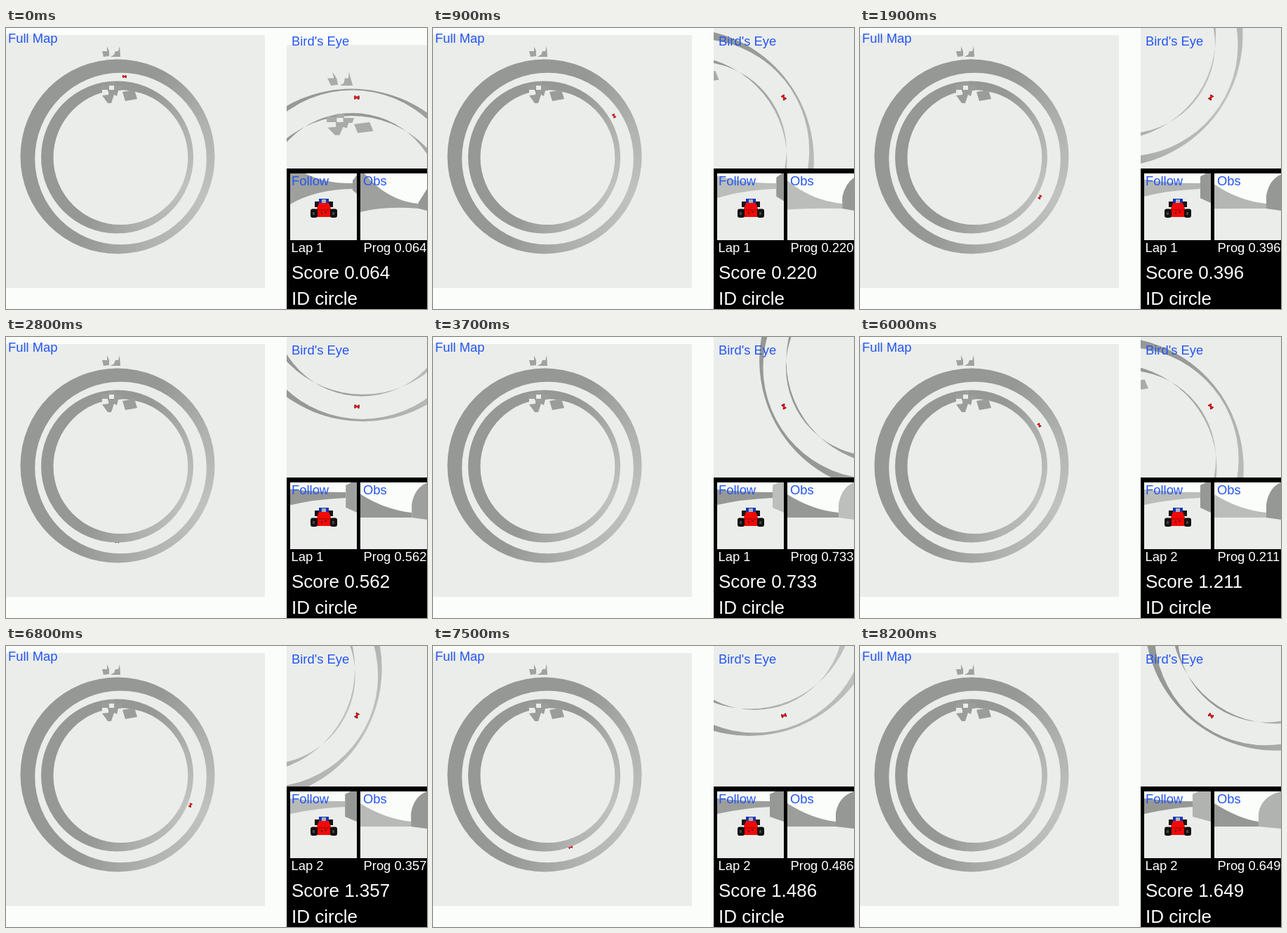
Animation, 600 px wide and 400 px high, one loop 8.3 s. Source, as an HTML page with a canvas:

```html
<!DOCTYPE html>
<html lang="en">
<head>
<meta charset="utf-8">
<title>Circle track</title>
<style>
  html, body { margin: 0; width: 600px; height: 400px; overflow: hidden; }
  canvas { display: block; }
</style>
</head>
<body>
<canvas id="stage" width="600" height="400"></canvas>
<script>
const ctx = document.getElementById('stage').getContext('2d');
const LOOP = 8300, STEP = 100, ZOOM = 1.3, RISE = 1.18;
const SKY = '#fbfdfa', FLOOR = '#ebedea', BLUE = '#2456f2', RED = '#f00a08';
const CENTRE = { x: 164, y: 183 };
const OUTER = 122, INNER = 97, LIGHT = 26 * Math.PI / 180;

// time, car angle clockwise from the top, score, left edge of the inner wall seen by the car
const KEYS = [
  [0, 2.5, 0.064, 588],
  [1900, 122, 0.396, 579],
  [3700, 246.6, 0.733, 578],
  [4800, 330.4, 0.956, 575],
  [6000, 417.9, 1.211, 579],
  [7500, 522.8, 1.486, 574],
  [8200, 574, 1.649, 568]
];

// Cubic Hermite interpolation through one column of KEYS
function sample(t, col) {
  const last = KEYS.length - 1;
  let i = 0;
  while (i < last - 1 && t >= KEYS[i + 1][0]) i++;
  const slope = j => {
    const a = KEYS[Math.max(0, j - 1)], b = KEYS[Math.min(last, j + 1)];
    return (b[col] - a[col]) / (b[0] - a[0]);
  };
  const a = KEYS[i], b = KEYS[i + 1], span = b[0] - a[0];
  const u = (t - a[0]) / span, v = 1 - u;
  return a[col] * (1 + 2 * u) * v * v + slope(i) * span * u * v * v
       + b[col] * u * u * (3 - 2 * u) - slope(i + 1) * span * u * u * v;
}

function rect(x, y, w, h, fill) {
  ctx.fillStyle = fill;
  ctx.fillRect(x, y, w, h);
}

function shape(path, fill) {
  ctx.fillStyle = fill;
  ctx.fill(new Path2D(path));
}

function text(str, x, y, size, fill) {
  ctx.font = `${size}px "Liberation Sans", Arial, sans-serif`;
  ctx.fillStyle = fill;
  ctx.fillText(str, x, y);
}

function view(x, y, w, h, draw) {
  ctx.save();
  ctx.beginPath();
  ctx.rect(x, y, w, h);
  ctx.clip();
  draw();
  ctx.restore();
}

// Visible side of a round wall: the area between its foot and its rim
function wall(foot, rim) {
  const g = ctx.createConicGradient(LIGHT, CENTRE.x, CENTRE.y);
  for (const at of [0, 1]) g.addColorStop(at, '#c0c2bf');
  for (const at of [0.125, 0.875]) g.addColorStop(at, '#b1b3b0');
  for (const at of [0.25, 0.75]) g.addColorStop(at, '#969895');
  ctx.fillStyle = g;
  ctx.beginPath();
  for (const [x, y, r] of [foot, rim]) {
    ctx.moveTo(x + r, y);
    ctx.arc(x, y, r, 0, Math.PI * 2);
  }
  ctx.fill('evenodd');
}

const GANTRY = 'M137 33H144V26L147 33V40L139 41ZM160 33L162 26L163 41H149L154 38L156 33Z';
const BOARD = 'M136 80H147V76H155V82H166L164 89H160L158 97L154 95L150 107H145L137 96L146 95V88H136Z' +
              'M166 91L183 88L187 101L170 104Z';
const HOLES = 'M147 82H154V88H147ZM137 88H145V95H137Z';

function banner(dy, squash, fill) {
  ctx.save();
  ctx.translate(0, 92 + dy);
  ctx.scale(1, squash);
  ctx.translate(0, -92);
  shape(BOARD, fill);
  shape(HOLES, FLOOR);
  ctx.restore();
}

function smallCar(car) {
  ctx.save();
  ctx.translate(car.x, car.y);
  ctx.rotate(car.angle);
  for (const x of [-2.8, 1.2]) rect(x, -2, 1.4, 4, '#301010');
  rect(-2.8, -1.2, 5.6, 2.4, RED);
  rect(1.8, -0.7, 0.8, 1.4, '#4048a0');
  ctx.restore();
}

function fullMap(car) {
  view(0, 10, 369, 360, () => {
    rect(0, 10, 369, 360, FLOOR);
    smallCar(car);
    wall([163.5, 186, 122.3], [159, 183, 138.5]);
    wall([163.4, 184.2, 95.9], [158.5, 184, 108.5]);
    shape(GANTRY, '#a0a29f');
    banner(0, 1, '#9b9d9a');
  });
}

function birdsEye(car) {
  view(400, 0, 200, 200, () => {
    rect(400, 0, 200, 200, SKY);
    ctx.translate(500, 99);
    ctx.scale(ZOOM, ZOOM);
    ctx.translate(-car.x, -car.y);
    rect(-100, 11.5, 600, 500, FLOOR);
    const raised = (r, k) => [car.x + (CENTRE.x - car.x) * k, car.y + (CENTRE.y - car.y) * k, r * k];
    for (const r of [OUTER, INNER]) wall(raised(r, 1), raised(r, RISE));
    banner(7, 0.75, '#a9aba8');
    ctx.save();
    ctx.translate(150, 49);
    ctx.transform(1, 0, (car.x - 150) * 0.012, 1, 0, 0);
    ctx.translate(-150, -34);
    shape(GANTRY, '#a9aba8');
    ctx.restore();
    smallCar(car);
  });
}

// Wall grey for a surface facing the given direction
function shade(angle) {
  const lit = Math.max(0, Math.cos(angle - 2.02));
  const v = Math.round(150 + 40 * lit);
  return `rgb(${v},${v + 2},${v - 1})`;
}

function followCar() {
  rect(440, 247, 6, 8, '#151515');
  rect(459, 247, 7, 8, '#151515');
  rect(446, 243, 14, 6, '#1234b8');
  shape('M446 249H460L463 257L465 269H441L443 257Z', RED);
  shape('M443 258H463L464 260H442Z', '#c40806');
  rect(450, 244, 6, 5, '#a9b0bd');
  rect(449, 262, 2, 3, '#801010');
  rect(454, 261, 3, 2, '#801010');
  for (const x of [434, 462]) {
    ctx.fillStyle = '#111';
    ctx.beginPath();
    ctx.roundRect(x, 257.5, 10, 12.5, 3);
    ctx.fill();
    rect(x + 3, 262, 3, 4, '#444');
  }
}

function cameras(t, angle) {
  const edge = sample(t, 3), near = edge - 94, start = Math.exp(-t / 700);
  const left = shade(angle + 0.6), right = shade(angle + 0.6 + Math.PI);

  view(405, 207, 95, 95, () => {
    rect(405, 207, 95, 95, SKY);
    rect(405, 228, 95, 74, FLOOR);
    shape(`M405 ${217 - 24 * start}Q440 ${221 + start} ${near} 221V229Q440 ${231 - start} 405 ${239 + 12 * start}Z`, left);
    shape(`M${near} ${243 - 12 * start}V${211 + 6 * start}L${near + 8} 207H500V${250 - 14 * start}Z`, right);
    followCar();
  });

  view(505, 207, 95, 95, () => {
    rect(505, 207, 95, 95, SKY);
    rect(505, 255, 95, 47, FLOOR);
    shape(`M505 ${224 - 24 * start}Q540 246 ${edge} 250V257Q540 ${257 - 4 * start} 505 ${257 + 5 * start}Z`, left);
    shape(`M${edge} 257V${238 + 10 * start}Q${edge + 4} ${214 + 28 * start} 600 ${207 + 22 * start}V260Z`, right);
  });
}

function draw(t) {
  const angle = sample(t, 1) * Math.PI / 180, score = sample(t, 2);
  const radius = 108 + 6 * Math.exp(-t / 1000);
  const car = {
    x: CENTRE.x + radius * Math.sin(angle),
    y: CENTRE.y - radius * Math.cos(angle),
    angle
  };

  rect(0, 0, 600, 400, SKY);
  fullMap(car);
  birdsEye(car);
  rect(400, 200, 200, 200, '#000');
  cameras(t, angle);

  text('Full Map', 3, 21, 18.4, BLUE);
  text("Bird's Eye", 407, 25, 18.4, BLUE);
  text('Follow', 407, 224, 18.4, BLUE);
  text('Obs', 509, 224, 18.4, BLUE);
  text('Lap ' + (1 + Math.floor(score)), 406.5, 319, 18.4, '#fff');
  text('Prog ' + (score % 1).toFixed(3), 509.5, 319, 18.4, '#fff');
  text('Score ' + score.toFixed(3), 407, 357, 26, '#fff');
  text('ID circle', 407, 394, 26, '#fff');
}

const begin = performance.now();
function tick() {
  const t = (performance.now() - begin) % LOOP;
  draw(Math.floor(t / STEP) * STEP);
  requestAnimationFrame(tick);
}
tick();
</script>
</body>
</html>
```
